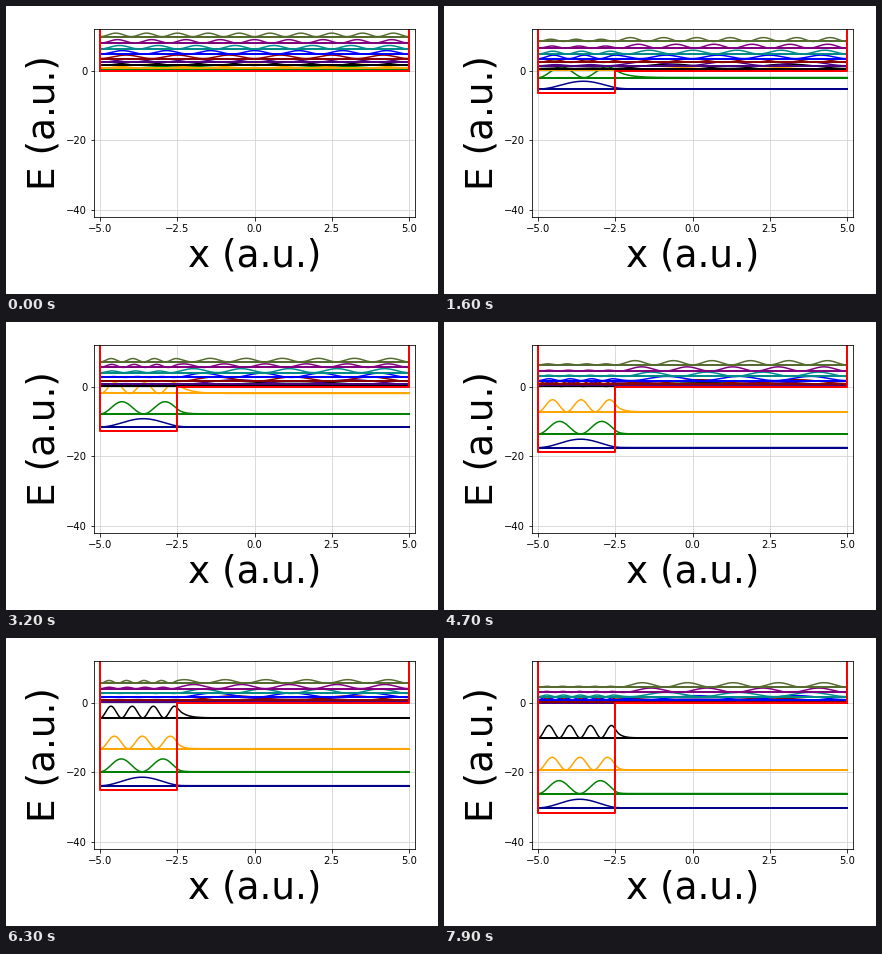
Write a matplotlib script that moves like this. It is 432x288 px and loops after 8 s.

```python
import numpy as np
import matplotlib.pyplot as plt
from matplotlib.animation import FuncAnimation

W, H, DPI = 432, 288, 72
FRAMES, INTERVAL = 80, 100
LENGTH, WELL, LEVELS = 10.0, 2.5, 10
DEPTH_STEP = 0.4
BASIS = 90
LABEL_SIZE = 37.4
COLORS = ["darkblue", "green", "orange", "black", "indigo",
          "darkred", "blue", "darkcyan", "purple", "darkolivegreen"]
SCALES = [3.3] + [5] * (LEVELS - 1)

# Sine basis of the empty box; the well overlap is known in closed form.
n = np.arange(1, BASIS + 1)
x = np.linspace(0, LENGTH, 501)
sines = np.sqrt(2 / LENGTH) * np.sin(np.outer(x, n) * np.pi / LENGTH)
kinetic = np.diag((n * np.pi / LENGTH) ** 2)


def cos_integral(k):
    return WELL * np.sinc(k * WELL / LENGTH)


overlap = (cos_integral(n[:, None] - n) - cos_integral(n[:, None] + n)) / LENGTH


def solve(depth):
    energy, coef = np.linalg.eigh(kinetic - depth * overlap)
    return energy[:LEVELS], (sines @ coef[:, :LEVELS]) ** 2


fig = plt.figure(figsize=(W / DPI, H / DPI), dpi=DPI, facecolor="white")
left, right, top, bottom = 88.2, 408.9, 23.2, 210.7
ax = fig.add_axes([left / W, 1 - bottom / H,
                   (right - left) / W, (bottom - top) / H])
ax.set_xlim(-5.2, 5.2)
ax.set_ylim(-42, 12)
ax.set_xticks([-5, -2.5, 0, 2.5, 5])
ax.set_yticks([-40, -20, 0])
ax.grid(color="lightgray", linewidth=0.8)
ax.set_xlabel("x (a.u.)", fontsize=LABEL_SIZE)
ax.set_ylabel("E (a.u.)", fontsize=LABEL_SIZE)

# Level lines lie over the densities, the well outline over both.
waves = [ax.plot([], [], color=c, lw=1.5)[0] for c in COLORS]
lines = [ax.plot([], [], color=c, lw=2)[0] for c in COLORS]
wall, = ax.plot([], [], color="red", lw=2)


def update(i):
    depth = i * DEPTH_STEP
    energies, densities = solve(depth)
    for k, e in enumerate(energies):
        waves[k].set_data(x - 5, e + SCALES[k] * densities[:, k])
        lines[k].set_data([-5, 5], [e, e])
    wall.set_data([-5, -5, -2.5, -2.5, 5, 5],
                  [50, -depth, -depth, 0, 0, 50])
    return waves + lines + [wall]


anim = FuncAnimation(fig, update, frames=FRAMES, interval=INTERVAL,
                     repeat=True, repeat_delay=0, blit=False)
plt.show()
```
